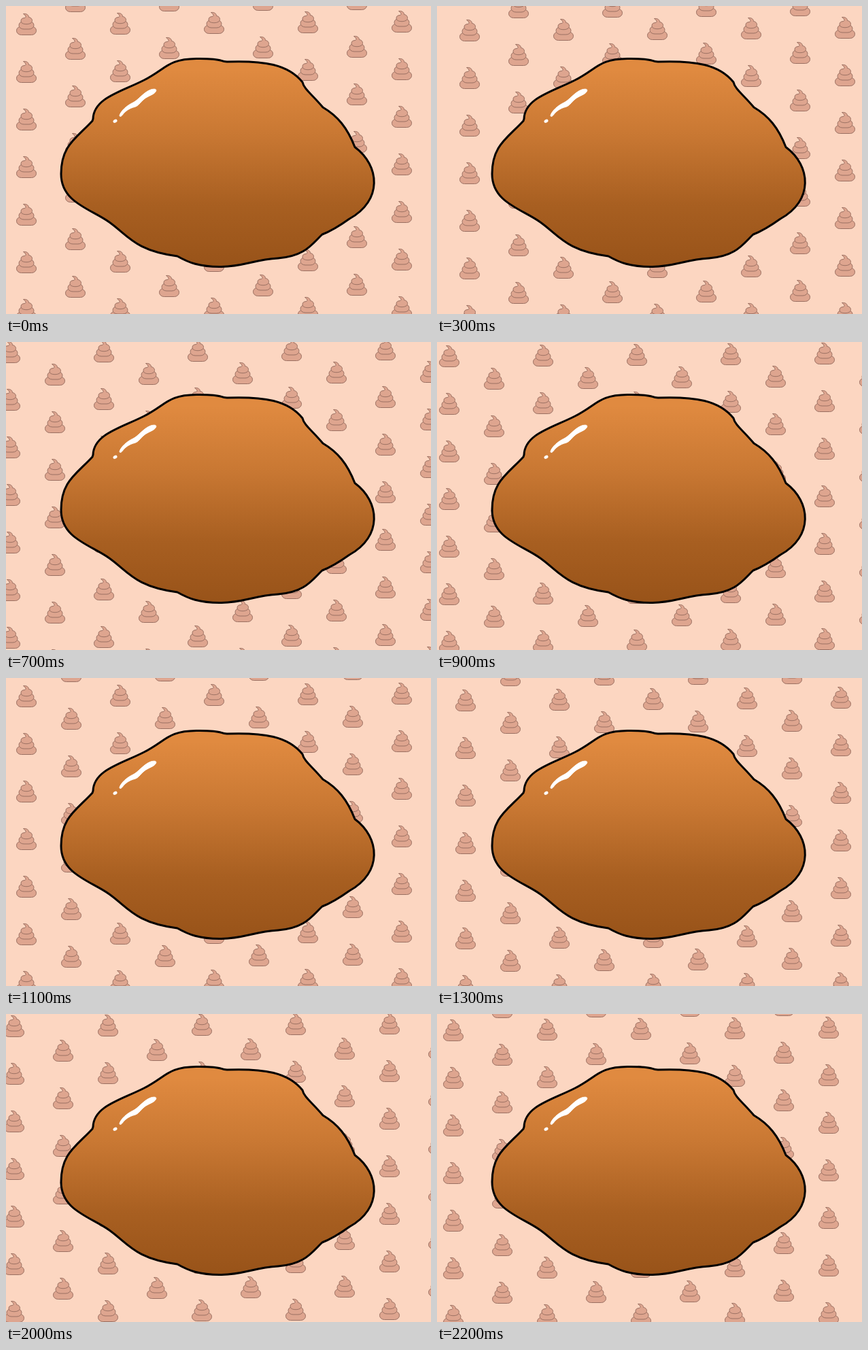
These frames come from a looping animation (625 by 453 pixels, 2300 ms). An HTML page:

```html
<!DOCTYPE html>
<html lang="en">
<head>
<meta charset="utf-8">
<title>Drifting pattern</title>
<style>
  html, body { margin: 0; width: 100%; height: 100%; overflow: hidden; background: #fcd6c1; }
  svg { display: block; width: 625px; height: 453px; }
  #pattern { animation: drift 2300ms steps(23, end) infinite; }
  @keyframes drift { to { transform: translate(138px, 69px); } }
</style>
</head>
<body>
<svg viewBox="0 0 625 453">
  <defs>
    <linearGradient id="brown" gradientUnits="userSpaceOnUse" x1="0" y1="78" x2="0" y2="384">
      <stop offset=".05" stop-color="#e08a40"/>
      <stop offset=".36" stop-color="#c97833"/>
      <stop offset=".7" stop-color="#a85f21"/>
      <stop offset="1" stop-color="#985319"/>
    </linearGradient>
    <!-- Three stacked rolls, the top one ending in a curl. -->
    <g id="swirl" fill="#dea58f" stroke="#9a7062" stroke-linejoin="round">
      <rect x="-14.5" y="3" width="29" height="12.5" rx="7" ry="6.2"/>
      <rect x="-11" y="-4.5" width="22" height="11.5" rx="7" ry="5.7"/>
      <path d="M-4.5-15.5C0-16.2 4-13.6 3.3-10.6C6.5-10.2 8.5-8 8.5-5.5C8.5-2.2 5-.3 0-.3
        C-5-.3-8-2-8-5C-8-8-6-9.2-3-9.4C.4-10-.6-13-4.5-15.5Z"/>
    </g>
  </defs>
  <rect width="625" height="453" fill="#fcd6c1"/>
  <g id="pattern"></g>
  <path fill="url(#brown)" stroke="#000" stroke-width="3" stroke-linejoin="round" d="M128 166
    C129 135 170 126 203 109S238 78 280 77.5S312 81.5 325 82
    C380 80 415 86 436 112C438 122 450 130 466 149C488 162 502 179 513 207.5
    C550 235 554 286 505 313C491 323 478 331 465 336C450 350 440 368 400 371
    C365 373 350 383 317 383.5S268 377 252 368C190 360 180 338 152 318
    S81 289 81 247S103 195 127 169Z"/>
  <g fill="#fff" stroke="#fff" stroke-linejoin="round">
    <path d="M167 161C169 154 178 146 187 142C195 138 202 127 213 123C218 121.5 222 122 220.5 125
      C219 130 209 132 203 137C197 142 195 147 189 148.5C181 150.5 175 155 171 160.5C169 163 167 163 167 161Z"/>
    <ellipse cx="160.5" cy="169.2" rx="2.7" ry="1.8" transform="rotate(-28 160.5 169.2)"/>
  </g>
</svg>
<script>
  const NS = 'http://www.w3.org/2000/svg';
  const pattern = document.getElementById('pattern');

  function addSwirl(x, y) {
    const use = document.createElementNS(NS, 'use');
    use.setAttribute('href', '#swirl');
    use.setAttribute('x', x);
    use.setAttribute('y', y);
    pattern.append(use);
  }

  // Two staggered columns per 138px, each pair one pixel higher than the last.
  for (let col = -1; col < 5; col++) {
    for (let row = -2; row < 7; row++) {
      const x = 30 + 138 * col, y = 27 - col + 70 * row;
      addSwirl(x, y);
      addSwirl(x + 72, y + 36);
    }
  }
</script>
</body>
</html>
```
